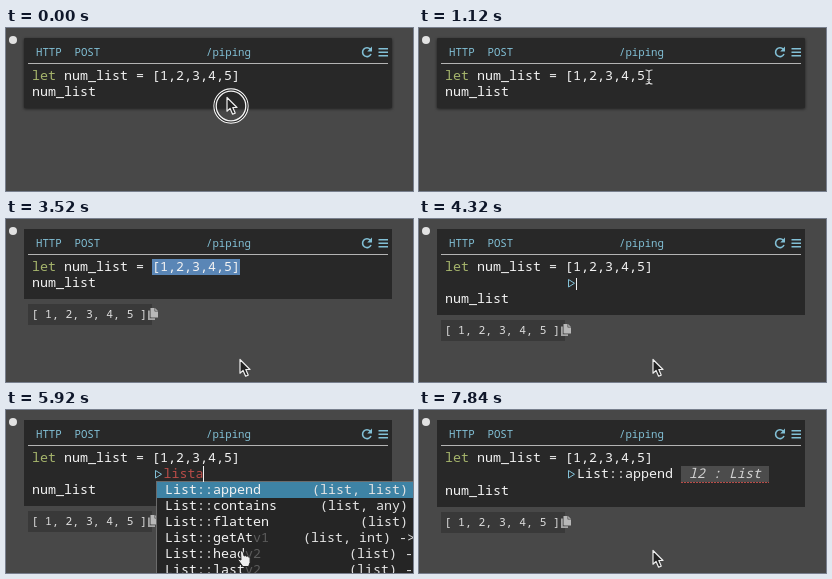
Recreate the animation shown at these times as an HTML page. Size 407 by 163 pixels, loop 8 s.

```html
<!DOCTYPE html>
<html lang="en">
<head>
<meta charset="utf-8">
<title>Piping a list</title>
<style>
html, body { margin: 0; width: 100%; height: 100%; overflow: hidden; background: #484848; }
svg { display: block; width: 407px; height: 163px; }
text { font-family: "Noto Sans Mono", "DejaVu Sans Mono", monospace; font-size: 13.33px; white-space: pre; }
.small { font-size: 10.7px; }
.out { font-size: 11.33px; }
</style>
</head>
<body>
<svg id="stage" viewBox="0 0 407 163"></svg>
<script>
const LOOP = 8000;
const WHITE = '#f2f2f2', BLUE = '#82c0d6', GREEN = '#a6b56c', RED = '#b84c48';
const stage = document.getElementById('stage');

const rect = (x, y, w, h, fill, more = '') =>
  `<rect x="${x}" y="${y}" width="${w}" height="${h}" fill="${fill}" ${more}/>`;
const text = (x, y, s, fill = WHITE, more = '') =>
  `<text x="${x}" y="${y}" fill="${fill}" ${more}>${s.replace(/>/g, '&gt;')}</text>`;
const path = (d, fill, more = '') => `<path d="${d}" fill="${fill}" ${more}/>`;

const rows = (names, sigs = []) => names.split(' ').map((name, i) => ({ name, sig: sigs[i] }));
const menus = {
  l: rows('let lambda List::append List::contains List::drop List::empty'),
  list: rows('List::append List::contains List::drop List::empty List::filter List::flatten'),
  lista: rows('List::append List::contains List::flatten List::getAt_v1 List::head_v2 List::last_v2',
    ['(list, list)', '(list, any)', '(list)', '(list, int) ->', '(list) ->', '(list) ->'])
};
menus.lis = menus.list;

// Each step overrides part of the state from its start time on.
const steps = [
  [0, { x: 225, y: 78, cursor: 'arrow', ring: true }],
  [160, { x: 232, y: 72 }],
  [320, { x: 242, y: 64, cursor: 'beam' }],
  [480, { x: 248, y: 56 }],
  [640, { x: 246, y: 51 }],
  [800, { x: 239, y: 48 }],
  [960, { x: 233, y: 48 }],
  [1120, { x: 230, y: 49, ring: false }],
  [1280, { x: 231, y: 60, ran: true, caret: [233, 40, 16] }],
  [1440, { x: 234, y: 94, cursor: 'arrow' }],
  [1600, { x: 237, y: 134 }],
  [1760, { x: 238, y: 149 }],
  [2080, { caret: null }],
  [2400, { sel: 1 }],
  [2560, { sel: 3 }],
  [2720, { sel: 5 }],
  [2880, { sel: 7 }],
  [3040, { sel: 9 }],
  [3200, { sel: 10 }],
  [3520, { sel: 11 }],
  [4320, { sel: 0, drop: 16, caret: [157, 59, 12] }],
  [4800, { caret: null }],
  [5280, { typed: 'l' }],
  [5440, { typed: 'lis', cursor: 'hand' }],
  [5600, { typed: 'list' }],
  [5920, { typed: 'lista' }],
  [6400, { typed: '', done: true, drop: 17, cursor: 'arrow', caret: [261, 56, 16] }],
  [6880, { caret: null }],
  [7360, { caret: [261, 56, 16] }],
  [7840, { caret: null }]
];

function header() {
  return text(30, 28, 'HTTP', BLUE, 'class="small"') +
    text(68.5, 28, 'POST', BLUE, 'class="small"') +
    text(200, 28, '/piping', BLUE, 'class="small"') +
    path('M364.3 21.3A4.4 4.4 0 1 0 365 26', 'none', `stroke="${BLUE}" stroke-width="1.6"`) +
    path('M366 18.6v4.8h-4.8z', BLUE) +
    [20, 23.5, 27].map(y => rect(372.5, y, 9.5, 1.5, BLUE)).join('') +
    rect(22, 35, 360, 1, '#b4b4b4');
}

function output(dy) {
  return `<g transform="translate(0 ${dy})">` +
    rect(22, 85, 124, 21, '#393939') +
    text(25.5, 99, '[ 1, 2, 3, 4, 5 ]', '#dedede', 'class="out"') +
    path('M144.5 89h4.5l3 3v6.5h-7.5z', '#b8b8b8') +
    path('M142 91.5h1.8v7.8h5.2v1.7h-7z', '#a6a6a6') +
    path('M148.8 89v3.2h3.2', 'none', 'stroke="#555" stroke-width=".8"') + '</g>';
}

function menu(items) {
  let s = rect(150, 71, 257, 92, '#6b6b6b') + rect(151, 72, 256, 91, '#252525') +
    rect(151, 72, 256, 16, '#3e83a5');
  items.forEach(({ name, sig }, i) => {
    const y = 84 + 16 * i, [base, version] = name.split('_');
    s += text(159, y, base);
    if (version) s += text(159 + 8 * base.length, y, version, '#5c5c5c');
    if (sig) {
      const x = sig.endsWith('>') ? (sig.length > 10 ? 297 : 343) : 402 - 8 * sig.length;
      s += text(x, y, sig, '#e4e4e4');
    }
  });
  return s;
}

const pointers = {
  arrow: path('M-4-8.5V5.2L-.9 2.4 1.6 8.2 4.2 7.1 1.8 1.5H6z', '#222',
    'stroke="#eee" stroke-width="1.2" stroke-linejoin="round"'),
  beam: ['stroke="#222" stroke-width="3"', 'stroke="#ddd" stroke-width="1.2"']
    .map(look => path('M-3.5-7Q0-7 0-5Q0-7 3.5-7M0-5V5M-3.5 7Q0 7 0 5Q0 7 3.5 7M-2 2.5H2', 'none', look)).join(''),
  hand: path('M-3.5-7.5q1.4-1.2 2.4 0l1.2 4.5q1.4-1 2.2.3 1.4-.8 2 .5 1.6-.5 1.8 1.2V3.5L4.6 7.5H-1.2L-5.5 1.5q-.2-2 2.5-.5z',
    '#eee', 'stroke="#222" stroke-width="1" stroke-linejoin="round"')
};

function pointer({ x, y, cursor, ring }) {
  const circle = (r, color) => `<circle r="${r}" fill="none" stroke="${color}" stroke-width="1.3"/>`;
  return `<g transform="translate(${x} ${y})">` +
    (ring ? circle(17, '#f4f4f4') + circle(15.9, '#222') + circle(14.8, '#f4f4f4') : '') +
    pointers[cursor] + '</g>';
}

function draw(s) {
  const drop = s.drop || 0;
  let out = '<circle cx="7" cy="12" r="4" fill="#e2e2e2"/>';
  out += rect(18, 10, 368, 70 + drop, '#282828',
    s.ran ? '' : 'rx="1" style="filter:drop-shadow(0 1px 1.5px #0009)"');
  out += header();
  if (s.sel) out += rect(234 - 8 * s.sel, 40, 8 * s.sel, 16, '#5a86b6');
  out += text(26, 52, 'let', GREEN) + text(58, 52, 'num_list = [1,2,3,4,5]');
  out += text(26, 68 + drop, 'num_list');
  if (s.ran) out += output(drop);
  if (drop) out += path('M149.5 60.5v7.5l6-3.75z', 'none', `stroke="${BLUE}" stroke-width="1"`);
  if (s.done) {
    out += text(158, 68, 'List::append') + rect(262, 56, 88, 16, '#4c4c4c') +
      text(270, 68, 'l2 : List', '#d2d2d2', 'font-style="italic"') +
      path('M262 72.5H350', 'none', `stroke="${RED}" stroke-dasharray="2 1"`);
  }
  if (s.typed) {
    out += text(157.5, 68, s.typed, RED) + menu(menus[s.typed]) +
      rect(157 + 8 * s.typed.length, 56, 1, 16, WHITE);
  }
  if (s.caret) {
    const [x, y, h] = s.caret;
    out += rect(x, y, 1, h, WHITE);
  }
  return out + pointer(s);
}

let shown = -1;
function tick() {
  const t = performance.now() % LOOP;
  const now = steps.filter(([start]) => start <= t);
  if (now.length !== shown) {
    shown = now.length;
    stage.innerHTML = draw(Object.assign({}, ...now.map(([, change]) => change)));
  }
  requestAnimationFrame(tick);
}
tick();
</script>
</body>
</html>
```
